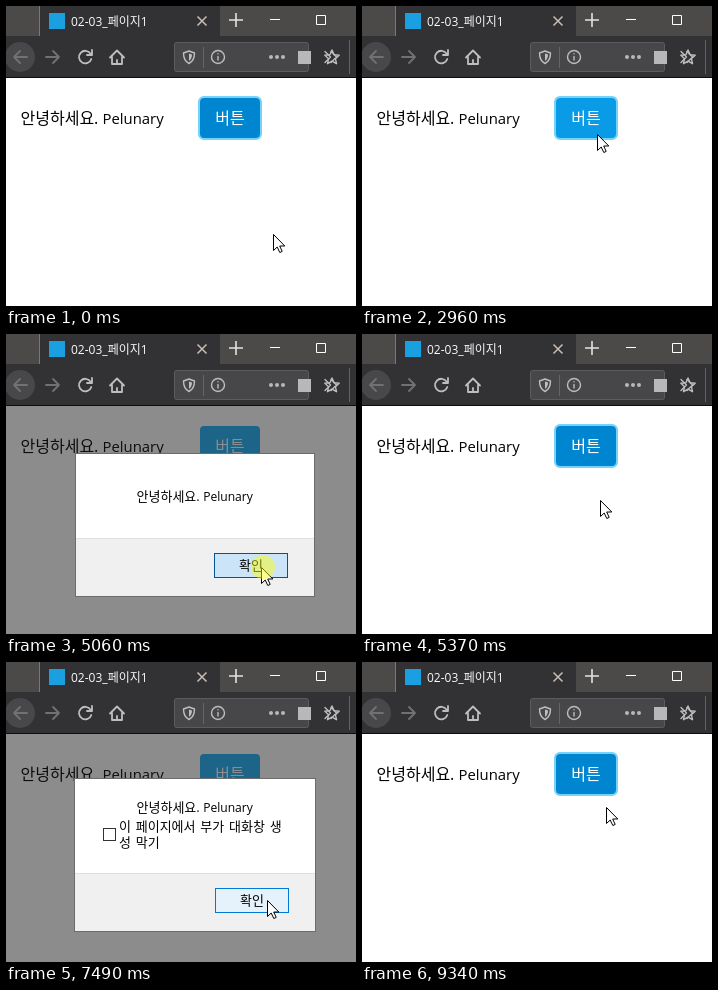
These frames come from a looping animation (350 by 300 pixels, 9.81 s). An HTML page:

```html
<!DOCTYPE html>
<html lang="ko">
<head>
<meta charset="utf-8">
<title>버튼 메시지</title>
<style>
  html, body { margin: 0; width: 100%; height: 100%; overflow: hidden; background: #fff; }
  svg { display: block; width: 350px; height: 300px; }
  text { font-family: "Open Sans", "Noto Sans CJK KR", "Noto Sans CJK", sans-serif; white-space: pre; }
  .name { font-size: .93em; }
  .big { font-size: 16px; }
  .small { font-size: 13px; word-spacing: 1.4px; }
  .greet { word-spacing: 0; }
  .line { fill: none; stroke: #bebebf; stroke-width: 1.8; stroke-linecap: round; stroke-linejoin: round; }
  .thin { stroke-width: 1.4; }
  .faint { stroke: #717173; }
</style>
</head>
<body>
<svg viewBox="0 0 350 300">
  <rect width="350" height="300" fill="#fff"/>

  <!-- page -->
  <text class="big" x="14.5" y="118">안녕하세요. <tspan class="name">Pelunary</tspan></text>
  <rect id="ring" x="193" y="91" width="62" height="42" rx="5" fill="none" stroke="#74d2fb" stroke-width="2"/>
  <rect id="btn" x="194" y="92" width="60" height="40" rx="4"/>
  <text class="big" x="209.3" y="118" fill="#fff">버튼</text>
  <rect id="dim" y="72" width="350" height="228" fill="#1a1a1a" opacity=".5"/>

  <!-- browser frame -->
  <rect width="350" height="31" fill="#4c4a48"/>
  <rect x="34" width="180" height="31" fill="#323234"/>
  <rect y="30" width="350" height="41" fill="#323234"/>
  <rect y="71" width="350" height="1" fill="#0c0c0d"/>
  <path d="M33.5 0v30" stroke="#7a7978"/>
  <rect x="43" y="7" width="16" height="16" fill="#1a9fe0"/>
  <text x="65" y="19.5" font-size="12" fill="#f9f9fa">02-03_페이지1</text>
  <path d="M191.5 10.5l9 9m0-9l-9 9" stroke="#c9bfb4" stroke-width="1.5"/>
  <path d="M223 14h14M230 7v14" stroke="#e4e4e4" stroke-width="1.6"/>
  <path d="M264 13.500h10M310.500 9.500h9v9h-9z" fill="none" stroke="#fff"/>
  <circle cx="14" cy="51" r="15" fill="#48484a"/>
  <path class="line faint" d="M21 51H8m6-6l-6 6 6 6M40 51h13m-6-6l6 6-6 6"/>
  <path class="line" d="M84.5 47.5a6.3 6.3 0 1 0 .8 5.5M86 44v5h-5"/>
  <path class="line" d="M104 51.5l7-7 7 7M106 51v7h10v-7M111 58v-4"/>
  <rect x="168.5" y="36.5" width="134" height="29" rx="2" fill="#474749" stroke="#5c5c5e"/>
  <path class="line thin" d="M183 45l5.5 2c0 5-1.5 8.5-5.5 10.5c-4-2-5.5-5.5-5.5-10.5z"/>
  <path d="M183 47.5l3 1c0 3-1 5-3 6.5z" fill="#bebebf"/>
  <path d="M197.5 41v21" stroke="#66666a"/>
  <circle class="line thin" cx="212" cy="51" r="6.5"/>
  <path class="line thin" d="M212 50.5v3.5M212 47.7v.1"/>
  <g fill="#b8b8b9">
    <circle cx="265" cy="51" r="2"/><circle cx="271" cy="51" r="2"/><circle cx="277" cy="51" r="2"/>
    <rect x="292" y="45" width="13" height="13"/>
  </g>
  <path class="line thin" d="M326 44l2.1 4.700 5.100.6-3.800 3.400 1.100 5-4.500-2.600-4.500 2.600 1.100-5-3.800-3.400 5.100-.6z"/>
  <path class="line thin" d="M319 45.500l5.500 5.500-5.500 5.500M325 45.500l5.500 5.500-5.500 5.500"/>
  <path d="M343.5 34v34" stroke="#626264"/>

  <!-- message box -->
  <g id="box">
    <rect id="panel" fill="#fff" stroke="#6c6c6c"/>
    <rect id="foot" fill="#f0f0f0"/>
    <rect id="rule" height="1" fill="#dfdfdf"/>
    <text id="msg" class="small greet" x="130.5">안녕하세요. <tspan class="name">Pelunary</tspan></text>
    <g id="more">
      <rect id="check" x="97.5" y="166.5" width="12" height="12" fill="#fff"/>
      <text class="small" x="113" y="168.5">이 페이지에서 부가 대화창 생</text>
      <text class="small" x="113" y="184.5">성 막기</text>
    </g>
    <rect id="ok"/>
    <text id="okText" class="small">확인</text>
  </g>

  <!-- pointer -->
  <g id="pointer">
    <path id="arrow" fill="#fff" stroke="#000" d="M-.5-.5V15.5L3.200 12l2.600 5.500 2.400-1.100L5.700 11H10.800z"/>
    <path id="hand" fill="#fff" stroke="#000" stroke-linejoin="round"
      d="M-2.500 12V0Q-2.500-1.500-1-1.500T.5 0V5.500Q3.500 4.500 4 6.500Q6.300 5.500 6.800 7.500Q9 7 9 9.500V14Q8.500 17 7.500 19.500H-1.500Q-2.500 16.500-6.500 11.500Q-7 9-5 9.500L-2.500 12M.5 5.500v4M4 6.500v3M6.800 7.500v3"/>
    <circle id="click" cx="1" cy="-1" r="12" fill="#ff0" opacity=".45"/>
  </g>
</svg>
<script>
const LOOP = 9810;
const START = [268, 229];
// first step, last step, step count, destination x, y
const MOVES = [
  [1770, 2170, 6, 236, 129],
  [4040, 4040, 1, 250, 190],
  [4130, 4210, 2, 256, 240],
  [4740, 4910, 3, 256, 234],
  [5140, 5370, 4, 239, 167],
  [5450, 5760, 5, 232, 127],
  [7180, 7490, 5, 262, 239],
  [8740, 9340, 9, 245, 146]
];
const COLD = '#0086d0', MID = '#0a9be6', HOT = '#1fb0f8';
const COLORS = [
  [0, COLD], [2090, MID], [2170, HOT], [2960, MID], [3020, HOT], [5140, MID], [5210, COLD],
  [5680, MID], [5760, HOT], [6390, MID], [6460, HOT], [8740, MID], [8820, COLD]
];
const SHAPES = [[0, 'arrow'], [2090, 'hand'], [2960, 'arrow'], [5680, 'hand'], [6390, 'arrow']];
const CLICKS = [[2870, 2960], [5060, 5140], [6310, 6390], [8570, 8740]];
const BOXES = [
  { from: 3020, to: 5140, x: 69, y: 119, w: 240, h: 144, split: 204, msg: 167, okX: 208, okY: 219, more: false },
  { from: 6460, to: 8740, x: 68, y: 116, w: 242, h: 154, split: 211, msg: 150, okX: 209, okY: 226, more: true }
];
const OK_W = 74, OK_H = 25;

const $ = id => document.getElementById(id);
const set = (id, attrs) => { for (const k in attrs) $(id).setAttribute(k, attrs[k]); };
const show = (id, on) => { $(id).style.display = on ? '' : 'none'; };
const held = (steps, t) => steps.filter(s => s[0] <= t).pop()[1];
const inside = ([px, py], x, y, w, h) => px >= x && px < x + w && py >= y && py < y + h;

function pointerAt(t) {
  let pos = START;
  for (const [first, last, count, x, y] of MOVES) {
    if (t < first) break;
    const gap = (last - first) / (count - 1 || 1);
    const step = gap ? Math.min(count, Math.floor((t - first) / gap + 0.001) + 1) : 1;
    const eased = 1 - (1 - step / count) ** 2;
    pos = [pos[0] + (x - pos[0]) * eased, pos[1] + (y - pos[1]) * eased];
  }
  return pos.map(Math.round);
}

function drawBox(b, pos, pressed) {
  set('panel', { x: b.x + .5, y: b.y + .5, width: b.w - 1, height: b.h - 1 });
  set('foot', { x: b.x + 1, y: b.split, width: b.w - 2, height: b.y + b.h - 1 - b.split });
  set('rule', { x: b.x + 1, y: b.split, width: b.w - 2 });
  set('msg', { y: b.msg });
  show('more', b.more);
  set('check', { stroke: inside(pos, 97, 158, 193, 30) ? '#0078d7' : '#333' });
  const hot = inside(pos, b.okX, b.okY, OK_W, OK_H);
  const line = hot ? 1 : 2;
  set('ok', {
    x: b.okX + line / 2, y: b.okY + line / 2, width: OK_W - line, height: OK_H - line,
    fill: pressed ? '#cce4f7' : hot ? '#e5f1fb' : '#e1e1e1',
    stroke: pressed ? '#005499' : '#0078d7', 'stroke-width': line
  });
  set('okText', { x: b.okX + 25, y: b.okY + 16.5 });
}

function draw(t) {
  const pos = pointerAt(t);
  const box = BOXES.find(b => t >= b.from && t < b.to);
  const clicked = CLICKS.some(([a, b]) => t >= a && t < b);
  const shape = held(SHAPES, t);
  set('btn', { fill: held(COLORS, t) });
  show('ring', !box);
  show('dim', box);
  show('box', box);
  if (box) drawBox(box, pos, clicked);
  show('click', clicked);
  show('arrow', shape === 'arrow');
  show('hand', shape === 'hand');
  set('pointer', { transform: `translate(${pos})` });
}

const begin = performance.now();
function tick() {
  draw((performance.now() - begin) % LOOP);
  requestAnimationFrame(tick);
}
tick();
</script>
</body>
</html>
```
